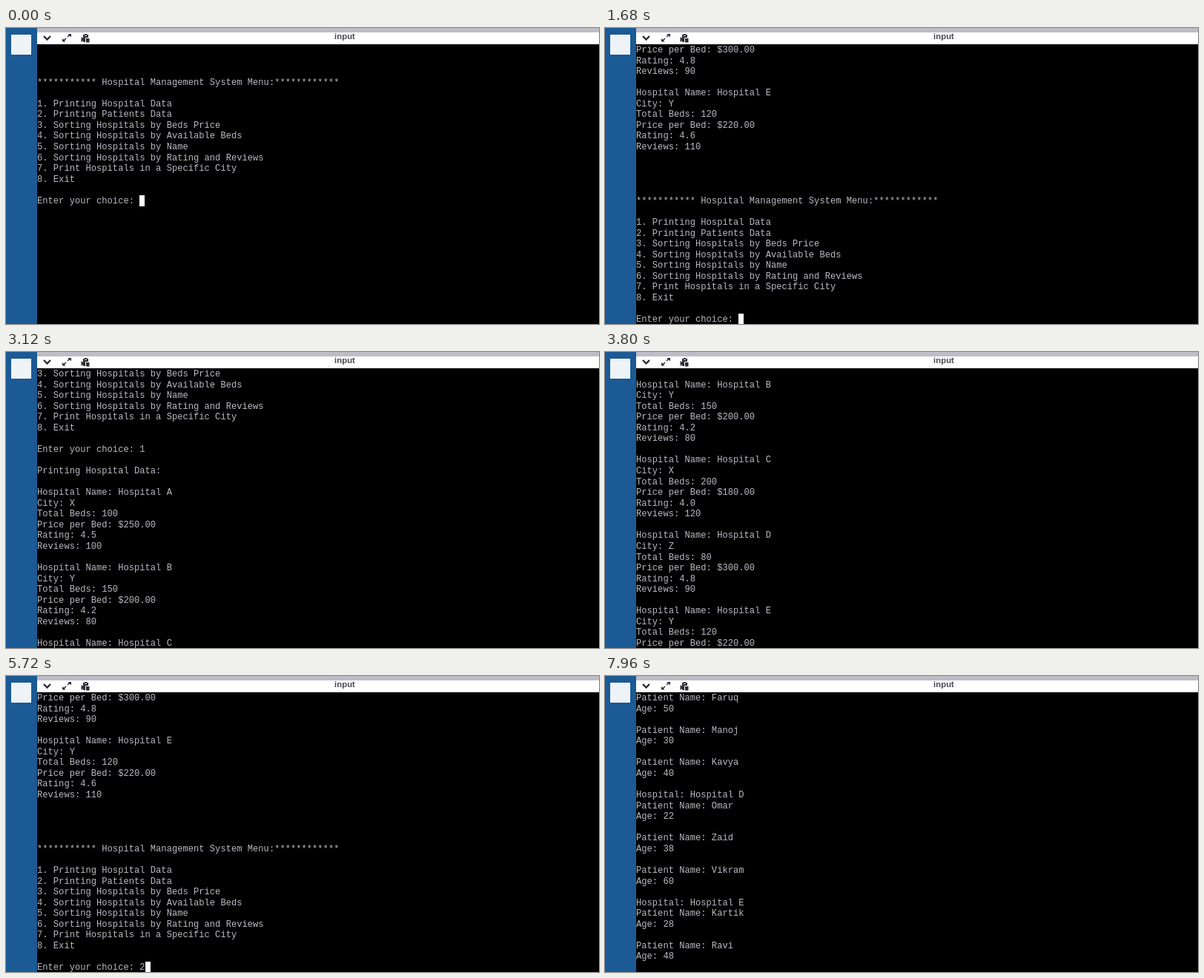
These frames come from a looping animation (800 by 400 pixels, 8000 ms). An HTML page with a canvas:

```html
<!DOCTYPE html>
<html lang="en">
<head>
<meta charset="utf-8">
<title>Terminal session</title>
<style>
  html, body { margin: 0; width: 100%; height: 100%; overflow: hidden; background: #000; }
  canvas { display: block; }
</style>
</head>
<body>
<canvas id="stage" width="800" height="400"></canvas>
<script>
const ctx = document.getElementById('stage').getContext('2d');

const LOOP = 8000, STEP = 40;
const ROWS = 26, LEFT = 42, TOP = 22.2, ROW_H = 14.56, CHAR_W = 7.28;
const INK = '#bcb8c4', DARK = '#2e2c33', PALE = '#eef3f8', BAR = '#fff';

const menu = `*********** Hospital Management System Menu:************

1. Printing Hospital Data
2. Printing Patients Data
3. Sorting Hospitals by Beds Price
4. Sorting Hospitals by Available Beds
5. Sorting Hospitals by Name
6. Sorting Hospitals by Rating and Reviews
7. Print Hospitals in a Specific City
8. Exit

Enter your choice: `;

const hospitals = [
  ['A', 'X', 100, 250, '4.5', 100],
  ['B', 'Y', 150, 200, '4.2', 80],
  ['C', 'X', 200, 180, '4.0', 120],
  ['D', 'Z', 80, 300, '4.8', 90],
  ['E', 'Y', 120, 220, '4.6', 110]
];

const patients = {
  A: [['Deepak', 25], ['Rohan', 45], ['Meena', 35]],
  B: [['Suresh', 52], ['Neha', 27], ['Gopal', 41]],
  C: [['Faruq', 50], ['Manoj', 30], ['Kavya', 40]],
  D: [['Omar', 22], ['Zaid', 38], ['Vikram', 60]],
  E: [['Kartik', 28], ['Ravi', 48], ['Nitin', 33]]
};

const hospitalText = ([id, city, beds, price, rating, reviews]) =>
  `Hospital Name: Hospital ${id}\nCity: ${city}\nTotal Beds: ${beds}\n` +
  `Price per Bed: $${price}.00\nRating: ${rating}\nReviews: ${reviews}\n\n`;

const patientText = ([name, age]) => `Patient Name: ${name}\nAge: ${age}\n\n`;

const wardText = id => `Hospital: Hospital ${id}\n` + patients[id].map(patientText).join('');

const prompt = '\n\n\n' + menu;
const hospitalOutput = '\n\nPrinting Hospital Data:\n\n' +
  hospitals.map(hospitalText).join('') + prompt;
const patientOutput = '\n\nPrinting Patients Data:\n\n' +
  Object.keys(patients).map(wardText).join('') + prompt;

// Output streams in at RATE characters per millisecond.
const RATE = 2;
const PARTIAL = '7. Print Ho';
const patientStart = 6840 - (patientOutput.indexOf(PARTIAL) + PARTIAL.length) / RATE;

const stream = (text, t, start) =>
  text.slice(0, Math.max(0, Math.round((t - start) * RATE)));

function sessionText(t) {
  return prompt +
    (t >= 560 ? '1' : '') + stream(hospitalOutput, t, 1000) +
    (t >= 5480 ? '2' : '') + stream(patientOutput, t, patientStart);
}

// Each run lists [time, first visible line]; outside the runs the view follows the output.
const scrollRuns = [
  [[1960, 42], [2640, 0], [2840, 0], [3120, 7], [3800, 24], [4520, 42]],
  [[7240, 110], [7960, 92], [8000, 91]]
];

function scrolledTop(t) {
  for (const run of scrollRuns) {
    for (let i = 1; i < run.length; i++) {
      const [t0, a] = run[i - 1], [t1, b] = run[i];
      if (t >= t0 && t < t1) return Math.round(a + (b - a) * (t - t0) / (t1 - t0));
    }
  }
  return null;
}

function rect(color, x, y, w, h) {
  ctx.fillStyle = color;
  ctx.fillRect(x, y, w, h);
}

function polygon(...points) {
  ctx.fillStyle = DARK;
  ctx.beginPath();
  points.forEach(([x, y]) => ctx.lineTo(x, y));
  ctx.fill();
}

function line(width, ...points) {
  ctx.strokeStyle = DARK;
  ctx.lineWidth = width;
  ctx.beginPath();
  points.forEach(([x, y]) => ctx.lineTo(x, y));
  ctx.stroke();
}

function drawTerminal(t) {
  const lines = sessionText(t).split('\n');
  const top = scrolledTop(t) ?? Math.max(0, lines.length - ROWS);
  rect('#000', 0, 0, 800, 400);
  ctx.font = '12.13px "Courier New", "Liberation Mono", monospace';
  ctx.textAlign = 'left';
  ctx.textBaseline = 'alphabetic';
  ctx.fillStyle = INK;
  for (let row = 0; row < ROWS && top + row < lines.length; row++) {
    ctx.fillText(lines[top + row], LEFT, Math.round(TOP + row * ROW_H + 10.8));
  }
  const cursorRow = lines.length - 1 - top;
  if (cursorRow < ROWS) {
    const x = Math.round(LEFT + lines.at(-1).length * CHAR_W);
    rect('#fff', x, Math.round(TOP + cursorRow * ROW_H), 7, 15);
  }
}

function drawToolbar() {
  rect('#bfbcc5', LEFT, 0, 758, 6);
  rect(BAR, LEFT, 6, 758, 16);

  line(2.4, [51, 11], [55.5, 15.5], [60, 11]);

  line(1.6, [83, 12], [86, 9]);
  line(1.6, [81, 14], [78, 17]);
  polygon([83.5, 8], [88, 8], [88, 12.5]);
  polygon([76, 14], [76, 18.5], [80.5, 18.5]);

  rect(DARK, 104, 9, 7, 10);
  rect(DARK, 106, 8, 3, 2);
  rect(BAR, 106, 10, 3, 1);
  rect(BAR, 107, 13, 6, 7);
  rect(DARK, 108, 14, 4.5, 5.5);
  polygon([101.5, 12], [106, 15.5], [101.5, 19]);

  ctx.font = 'bold 11.4px Arial, "Liberation Sans", sans-serif';
  ctx.textAlign = 'center';
  ctx.fillStyle = '#4b4951';
  ctx.fillText('input', 457, 15);
}

function drawSidebar() {
  rect('#1b5a94', 0, 0, 42, 400);
  rect(PALE, 7, 9, 27, 27);
}

function frame(now) {
  const t = Math.floor((now % LOOP) / STEP) * STEP;
  drawTerminal(t);
  drawToolbar();
  drawSidebar();
  requestAnimationFrame(() => frame(performance.now() - begin));
}

const begin = performance.now();
frame(0);
</script>
</body>
</html>
```
